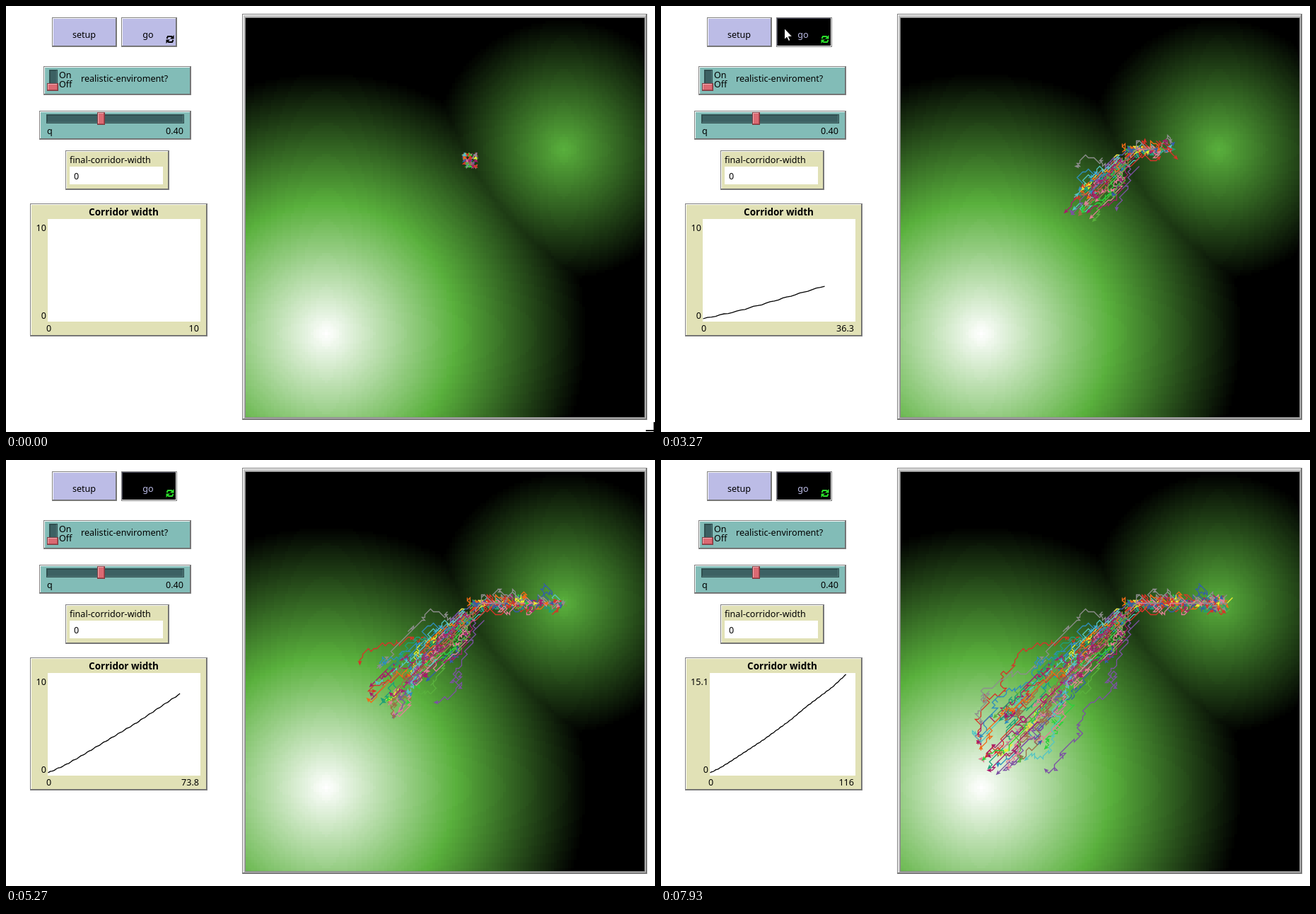
Recreate the animation shown at these times as an HTML page with a canvas. Size 918 px wide and 602 px high, loop 8000 ms.

```html
<!DOCTYPE html>
<html lang="en">
<head>
<meta charset="utf-8">
<title>Corridor width</title>
<style>
  html, body { margin: 0; width: 100%; height: 100%; overflow: hidden; background: #fff; }
  canvas { display: block; }
</style>
</head>
<body>
<canvas id="stage" width="918" height="602"></canvas>
<script>
const LOOP = 8000, STEP = 1000 / 15;
const PATCH = 4, SIZE = 141, VIEW_X = 339, VIEW_Y = 17;
const ctx = document.getElementById('stage').getContext('2d');

// ---------- helpers ----------
let seed = 7;
function random() {
  seed = (seed + 0x6D2B79F5) | 0;
  let r = Math.imul(seed ^ (seed >>> 15), 1 | seed);
  r = (r + Math.imul(r ^ (r >>> 7), 61 | r)) ^ r;
  return ((r ^ (r >>> 14)) >>> 0) / 4294967296;
}

// Linear interpolation through [position, value, value...] points.
function along(points, p, column = 1) {
  let i = 1;
  while (i < points.length - 1 && p > points[i][0]) i++;
  const a = points[i - 1], b = points[i];
  const k = Math.max(0, Math.min(1, (p - a[0]) / (b[0] - a[0])));
  return a[column] + (b[column] - a[column]) * k;
}

function rect(x, y, w, h, color) {
  ctx.fillStyle = color;
  ctx.fillRect(x, y, w, h);
}

// A one-pixel outline around a one-pixel raised (or sunken) edge.
function bevel(x, y, w, h, fill, [outline, light, dark] = ['#808080', '#fff', '#6e6e6e']) {
  rect(x, y, w, h, outline);
  rect(x + 1, y + 1, w - 2, h - 2, dark);
  rect(x + 1, y + 1, w - 3, h - 3, light);
  rect(x + 2, y + 2, w - 4, h - 4, fill);
}

function text(s, x, y, align = 'left', color = '#000', font = '12.6px') {
  ctx.font = font + ' "Noto Sans", "Open Sans", sans-serif';
  ctx.textAlign = align;
  ctx.fillStyle = color;
  ctx.fillText(s, x, y);
}

function polygon(points) {
  ctx.beginPath();
  points.forEach(([x, y]) => ctx.lineTo(x, y));
  ctx.closePath();
}

// ---------- landscape: the higher of two cones ----------
const BIG = { x: 28, y: 111, top: 92 }, SMALL = { x: 112, y: 46, top: 46 };
const cone = (c, x, y) => c.top - Math.hypot(x - c.x, y - c.y);
const height = (x, y) => Math.max(cone(BIG, x, y), cone(SMALL, x, y));

const field = document.createElement('canvas');
field.width = field.height = SIZE;
{
  const g = field.getContext('2d'), image = g.createImageData(SIZE, SIZE);
  for (let i = 0; i < SIZE * SIZE; i++) {
    const level = Math.max(0, height(i % SIZE, Math.floor(i / SIZE)) / BIG.top);
    const shade = Math.round(level * 100) / 50 - 1;
    [89, 176, 60].forEach((c, k) => {
      image.data[i * 4 + k] = c + (shade < 0 ? c : 255 - c) * shade;
    });
    image.data[i * 4 + 3] = 255;
  }
  g.putImageData(image, 0, 0);
}

// ---------- walkers: uphill with probability Q, otherwise a random neighbour ----------
const Q = 0.4, WALKERS = 50, LAST_TICK = 111;
const COLORS = ['#d73229', '#2d8dbe', '#a71b6a', '#2cd13b', '#e07f96', '#1d9f78', '#7c50a4',
  '#f16a15', '#54c4c4', '#59b03c', '#d73229', '#345da9', '#e07f96', '#8d8d8d', '#9d6e48', '#a71b6a', '#eded31'];
const NEIGHBOURS = [[0, -1], [1, -1], [1, 0], [1, 1], [0, 1], [-1, 1], [-1, 0], [-1, -1]];
const jitter = () => Math.floor(random() * 5) - 2;

const walkers = Array.from({ length: WALKERS }, (_, i) => {
  let x = 79 + jitter(), y = 50 + jitter();
  let heading = random() * 2 * Math.PI;
  const path = [{ x, y, heading }];
  for (let tick = 0; tick < LAST_TICK; tick++) {
    let move = NEIGHBOURS[Math.floor(random() * 8)];
    if (random() < Q) {
      move = [0, 0];
      for (const n of NEIGHBOURS)
        if (height(x + n[0], y + n[1]) > height(x + move[0], y + move[1])) move = n;
    }
    if (move[0] || move[1]) heading = Math.atan2(move[0], -move[1]);
    x += move[0];
    y += move[1];
    path.push({ x, y, heading });
  }
  return { path, color: COLORS[i % COLORS.length] };
});

const px = p => VIEW_X + PATCH * p.x + 1.5;
const py = p => VIEW_Y + PATCH * p.y + 1.5;

function drawView(tick) {
  bevel(334, 11, 573, 574, '#c4c4c4');
  rect(338, 16, 566, 566, '#808080');
  ctx.imageSmoothingEnabled = false;
  ctx.drawImage(field, VIEW_X, VIEW_Y, SIZE * PATCH, SIZE * PATCH);
  ctx.lineWidth = 1.3;
  for (const { path, color } of walkers) {
    ctx.strokeStyle = color;
    ctx.beginPath();
    for (let i = 0; i <= tick; i++) ctx.lineTo(px(path[i]), py(path[i]));
    ctx.stroke();
  }
  for (const { path, color } of walkers) {
    const p = path[tick];
    ctx.save();
    ctx.translate(px(p), py(p));
    ctx.rotate(p.heading);
    polygon([[0, -4], [-3, 3], [0, 1.5], [3, 3]]);
    ctx.fillStyle = color;
    ctx.fill();
    ctx.restore();
  }
}

// ---------- controls ----------
function drawLoopIcon(color) {
  ctx.strokeStyle = ctx.fillStyle = color;
  ctx.lineWidth = 2;
  for (const turn of [0, Math.PI]) {
    ctx.save();
    ctx.translate(232, 47);
    ctx.rotate(turn);
    ctx.beginPath();
    ctx.moveTo(-4.5, -1);
    ctx.lineTo(-3, -4);
    ctx.lineTo(2, -4);
    ctx.lineTo(3.5, -2.5);
    ctx.stroke();
    polygon([[5.5, -6], [5.5, -0.5], [0, -0.5]]);
    ctx.fill();
    ctx.restore();
  }
}

function drawControls(running) {
  const lilac = '#bcbce6', teal = '#82bcb7', sand = '#e1e1b6', slot = '#3c6163', knob = '#db6a73';
  const sunken = ['#808080', '#4a4a5a', '#f4f4f4'];
  const groove = ['#304f50', '#304f50', '#527a7a'], raised = ['#7c3a40', '#f0b0b4', '#b04a52'];

  bevel(65, 16, 92, 42, lilac);
  text('setup', 110.5, 45, 'center');
  bevel(163, 16, 79, 42, running ? '#000' : lilac, running ? sunken : undefined);
  text('go', 201, 45, 'center', running ? lilac : '#000');
  drawLoopIcon(running ? '#2be02b' : '#000');

  bevel(53, 85, 209, 41, teal);
  bevel(61, 90, 12, 28, slot, groove);
  bevel(58, 109, 16, 11, knob, raised);
  text('On', 75, 102);
  text('Off', 75, 115);
  text('realistic-enviroment?', 106, 107);

  bevel(47, 148, 215, 41, teal);
  bevel(57, 153, 195, 13, slot, groove);
  bevel(129, 150, 11, 18, knob, raised);
  text('q', 58, 181);
  text('0.40', 251, 181, 'right');

  bevel(84, 204, 147, 56, sand);
  text('final-corridor-width', 90, 222);
  rect(90, 227, 132, 25, '#fff');
  text('0', 96, 245);

  bevel(34, 279, 251, 188, sand);
}

// ---------- plot ----------
const WIDTHS = [[0, 0], [8, 0.75], [15, 1.57], [43, 5.07], [64, 8], [77, 10.09], [98, 13.1], [109, 15.05]];
const Y_LIMITS = [10, 11.1, 12.45, 13.7, 15.1];
const corridor = tick => Math.max(0, along(WIDTHS, tick) + 0.04 * Math.sin(tick * 1.7));
const label = v => v >= 100 ? v.toFixed(0) : String(+v.toFixed(1));

function drawPlot(tick) {
  let xMax = 10;
  for (let i = 0; i <= tick; i++) if (i > xMax) xMax = i * 1.25;
  const now = corridor(tick);
  const yMax = Y_LIMITS.find(limit => now <= limit) || 15.1;
  const left = yMax > 10 ? 69 : 59;

  rect(left, 301, 275 - left, 145, '#fff');
  text('Corridor width', (left + 274) / 2, 296, 'center', '#000', 'bold 13.5px');
  text(label(yMax), left - 2, 318, 'right');
  text('0', left - 2, 442, 'right');
  text('0', left - 2, 460);
  text(label(xMax), 273, 460, 'right');

  if (!tick) return;
  ctx.strokeStyle = '#000';
  ctx.lineWidth = 1.3;
  ctx.beginPath();
  for (let i = 0; i <= tick; i++)
    ctx.lineTo(left + 0.5 + i / xMax * (274 - left), 442 - corridor(i) / yMax * 139.5);
  ctx.stroke();
}

// ---------- pointer ----------
const POINTER = [[3, 917, 600], [12, 178, 52], [14, 171, 46], [16, 231, 50], [17, 205, 38],
  [18, 174, 31], [72, 174, 31], [73, 140, 90], [75, 18, 330]];

function drawPointer(step) {
  if (step > 75) return;
  const x = Math.round(along(POINTER, step)), y = Math.round(along(POINTER, step, 2));
  if (x > 300) {
    ctx.globalCompositeOperation = 'difference';
    rect(x - 12, y - 1, 25, 2, '#fff');
    rect(x - 1, y - 12, 2, 11, '#fff');
    rect(x - 1, y + 1, 2, 12, '#fff');
    ctx.globalCompositeOperation = 'source-over';
    return;
  }
  ctx.save();
  ctx.translate(x + 0.5, y + 0.5);
  polygon([[0, 0], [0, 16], [3.5, 12.8], [6, 18], [8.4, 17], [6, 12], [11, 11.5]]);
  ctx.fillStyle = '#fff';
  ctx.strokeStyle = '#000';
  ctx.lineWidth = 1;
  ctx.fill();
  ctx.stroke();
  ctx.restore();
}

// ---------- timeline ----------
const TICKS = [[20, 0], [37, 15], [61, 43], [79, 64], [90, 77], [107, 98], [111, 102], [116, 109]];

function draw(time) {
  const step = Math.floor((time % LOOP + 4) / STEP);
  const tick = Math.round(along(TICKS, step));
  const viewTick = tick + Math.max(0, Math.min(2, step - 117));
  rect(0, 0, 918, 602, '#fff');
  drawView(viewTick);
  drawControls(step >= 21);
  drawPlot(tick);
  drawPointer(step);
}

let start;
function frame(now) {
  start ??= now;
  draw(now - start);
  requestAnimationFrame(frame);
}
requestAnimationFrame(frame);
</script>
</body>
</html>
```
